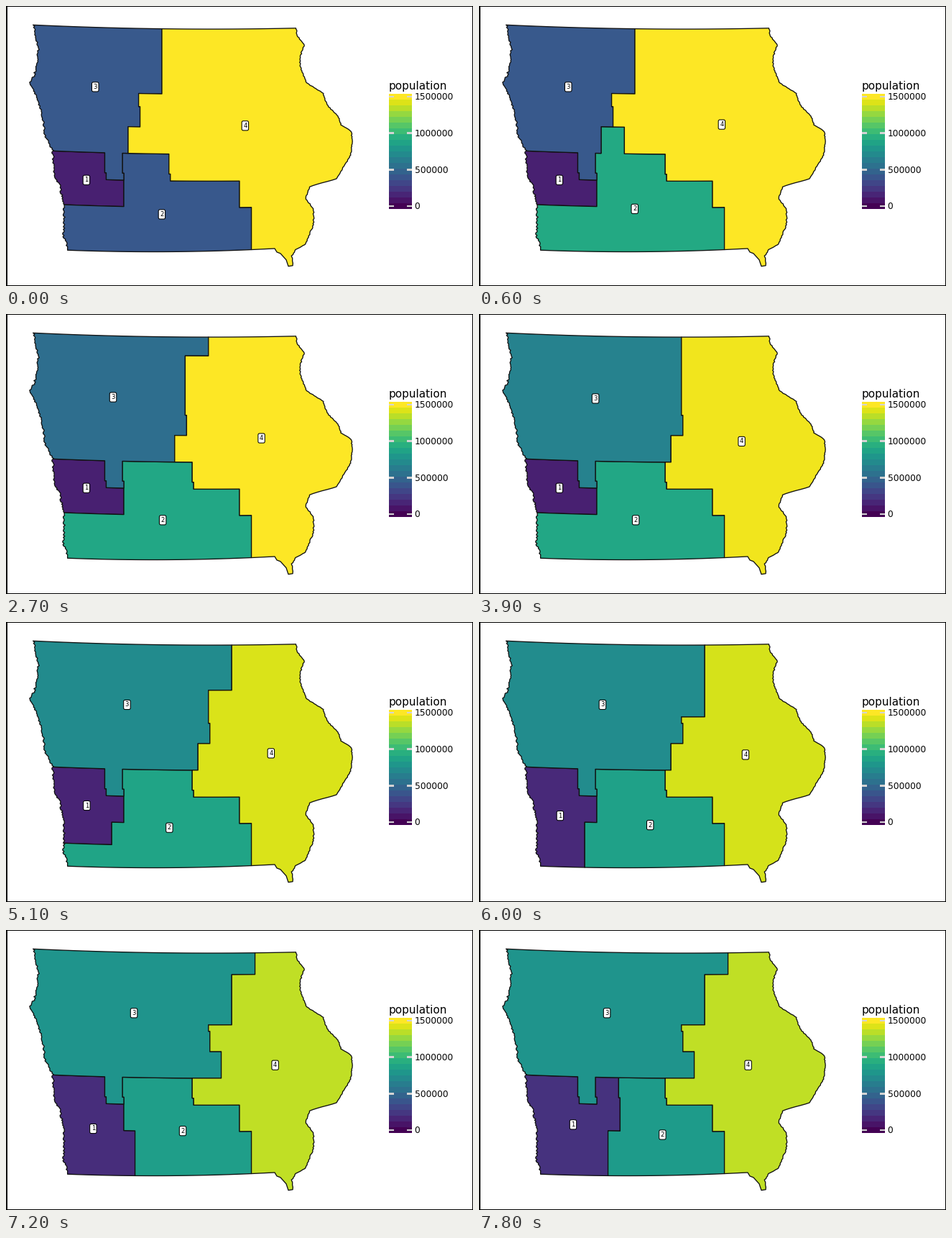
A matplotlib script for the animation above (8 s loop, 650 by 389 pixels).

```python
import numpy as np
import matplotlib.pyplot as plt
from matplotlib.animation import FuncAnimation
from matplotlib.patches import PathPatch, Rectangle
from matplotlib.path import Path

W, H, DPI = 650, 389, 100
TICKS_PER_MOVE = 3  # one move every 300 ms
MAX_POP = 1500  # thousands
plt.rcParams["font.family"] = "DejaVu Sans"
viridis = plt.get_cmap("viridis")

# The map is laid out on a straight grid, which the projection then bends.
SAG = 9.5e-5
COL, JOG = 32.4, 2  # county width, sideways step at a survey correction line
TOP, ROW1, ROW1_EAST, ROW2, MID, ROW3 = 32.4, 58.5, 62.4, 95.2, 122.8, 132.2
ROW4, ROW5, ROW6, ROW7, ROW8 = 169.2, 206.2, 243.6, 280.3, 311.5
JOG_NORTH, JOG_SOUTH = 141, 234
SOUTH = None  # bottom edge that follows the southern border


def bend(points):
    x, y = np.array(points).T
    return np.column_stack([x, y - SAG * (x - 285) ** 2])


def south(x):
    return 341.8 - 1.6e-4 * (x - 205) ** 2 + SAG * (x - 285) ** 2


def river(key_points, wiggle, seed):
    """River bank as x over y: key points joined, with seeded wiggles."""
    x, y = np.array(key_points).T
    y = y + SAG * (x - 285) ** 2
    ys = np.arange(TOP, y[-1], 1.7)
    noise = np.random.default_rng(seed).uniform(-wiggle, wiggle, len(ys))
    return ys, np.interp(ys, y, x) + noise


west = river([(38, 26), (41, 40), (45, 60), (44, 80), (39, 97), (33, 107), (44, 128),
              (51, 155), (54, 180), (65, 201), (67, 234), (75, 250), (80, 276),
              (81, 300), (80, 320), (87, 338)], 1.5, 8)
east = river([(404, 30), (405, 41), (415, 54), (409, 72), (410, 86), (418, 107),
              (441, 121), (447, 138), (464, 156), (466, 165), (481, 175), (482, 190),
              (480, 207), (471, 222), (459, 241), (440, 246), (423, 251), (417, 268),
              (428, 282), (428, 304), (417, 331), (403, 339), (398, 347), (399, 361)],
             0.8, 3)


def side(edge, y0, y1, jog):
    """Points down one side of a strip: a river bank or a county line."""
    if isinstance(edge, tuple):
        ys, xs = edge
        y1 = y1 or (south(87) if edge is west else ys[-1])
        inner = (ys > y0) & (ys < y1)
        y = np.concatenate([[y0], ys[inner], [y1]])
        return list(zip(np.interp(y, ys, xs), y))
    if jog:
        return [(edge, y0), (edge, jog), (edge + JOG, jog), (edge + JOG, y1)]
    return [(edge, y0), (edge, y1 or south(edge))]


def strip(left, right, y0, y1, jog=None, bottom=()):
    a, b = side(left, y0, y1, jog), side(right, y0, y1, jog)
    if y1 is SOUTH and right is not east:
        bottom = [(x, south(x)) for x in range(0, W, 10) if a[-1][0] < x < b[-1][0]]
    points = a + list(bottom) + b[::-1]
    return [(round(float(x), 2), round(float(y), 2)) for x, y in points]


# Row letter: top, bottom, left of column 0, jog
rows = {
    "A": (TOP, ROW1, 217, None), "B": (ROW1, ROW2, 217, None),
    "N": (TOP, ROW1_EAST, 217, None), "M": (ROW1_EAST, ROW2, 217, None),
    "C": (ROW2, ROW3, 217, None), "D": (ROW3, ROW4, 217, JOG_NORTH),
    "W": (MID, ROW4, 217 - COL, JOG_NORTH), "E": (ROW4, ROW5, 170, None),
    "F": (ROW5, ROW6, 162, JOG_SOUTH), "G": (ROW6, ROW7, 162 + JOG, None),
    "H": (ROW7, ROW8, 82.4, None), "I": (ROW8, SOUTH, 82.4, None),
}


def line(row, col):
    return rows[row][2] + COL * col


def county(cell):
    row, col = cell[0], int(cell[1])
    y0, y1, _, jog = rows[row]
    left = west if cell in ("H0", "I0") else line(row, col)
    return strip(left, line(row, col + 1), y0, y1, jog)


cores = {
    1: [strip(west, 137.5, ROW5, ROW6, JOG_SOUTH), strip(west, line("G", 0), ROW6, ROW7)],
    2: [county("F1"), strip(line("G", 1), 325, ROW6, ROW7),
        strip(line("H", 3), line("H", 8), ROW7, SOUTH)],
    3: [strip(west, 217, TOP, MID), strip(west, line("W", 0), MID, ROW4, JOG_NORTH),
        strip(west, line("E", 0), ROW4, ROW5),
        strip(137.5, line("F", 0), ROW5, ROW6, JOG_SOUTH)],
    4: [strip(line("N", 4), east, TOP, ROW1_EAST),
        strip(line("N", 3), east, ROW1_EAST, ROW3),
        strip(line("D", 2), east, ROW3, ROW4, JOG_NORTH),
        strip(line("E", 4), east, ROW4, ROW5),
        strip(line("F", 3), east, ROW5, ROW6, JOG_SOUTH),
        strip(325, east, ROW6, ROW7),
        strip(line("H", 8), east, ROW7, SOUTH,
              bottom=[(374, 338), (377, 343), (382, 345), (390, 354), (393, 363)])],
}

moves = ("E0>2 F2>2 E0>3 W0>3 A0+B0>3 E1>3 D0>3 C0>3 A1>3 B1>3 C1>3 D1>3 E2>3 "
         "N2>3 H0>1 M2>3 H1>1 I0>1 C2>3 I1>1 N3>3 H2>1 I2>1 E3>3 G0>1 F0>1").split()
cells = sorted({c for m in moves for c in m[:-2].split("+")})
start_owner = {c: 2 if c[0] in "FGHI" and c != "F2" else 4 for c in cells}
start_pop = {1: 131, 2: 405, 3: 415, 4: 2205}
RURAL_POP = 10
city_pop = {"F2": 490, "E2": 97, "M2": 42, "E3": 39, "W0": 36, "E1": 26}

# ---------- joining counties into districts ----------
county_shapes = {c: county(c) for c in cells}
all_shapes = sum(cores.values(), list(county_shapes.values()))
joints = {p for shape in all_shapes for p in shape}
joints |= {(x, r[0]) for r in rows.values() for x in range(40, 480, 20)}


def edges_of(shape):
    """Directed edges, split wherever a neighbour's corner touches them."""
    out = []
    for a, b in zip(shape, shape[1:] + shape[:1]):
        stops = [a, b]
        for i in (0, 1):
            if a[i] == b[i]:
                low, high = sorted((a[1 - i], b[1 - i]))
                stops = sorted((p for p in joints
                                if p[i] == a[i] and low <= p[1 - i] <= high),
                               key=lambda p: abs(p[1 - i] - a[1 - i]))
        out += zip(stops, stops[1:])
    return out


core_edges = {d: sum(map(edges_of, shapes), []) for d, shapes in cores.items()}
county_edges = {c: edges_of(s) for c, s in county_shapes.items()}


def outline(edges):
    """Rings left over once shared borders cancel out."""
    edges = set(edges)
    after = {a: b for a, b in edges if (b, a) not in edges}
    rings = []
    while after:
        ring = [min(after)]
        while ring[-1] in after:
            ring.append(after.pop(ring[-1]))
        rings.append(bend(ring))
    return rings


def centroid(rings):
    area, total = 0, np.zeros(2)
    for ring in rings:
        a, b = ring[:-1], ring[1:]
        cross = a[:, 0] * b[:, 1] - b[:, 0] * a[:, 1]
        area += cross.sum() / 2
        total += ((a + b) * cross[:, None]).sum(axis=0) / 6
    return total / area


def district_states():
    """Path, colour and label position of every district after each move."""
    owner, pop = dict(start_owner), dict(start_pop)
    states = []
    for move in [""] + moves:
        for cell in move[:-2].split("+") if move else []:
            people, new = city_pop.get(cell, RURAL_POP), int(move[-1])
            pop[owner[cell]] -= people
            pop[new] += people
            owner[cell] = new
        state = {}
        for d in cores:
            owned = [county_edges[c] for c in cells if owner[c] == d]
            rings = outline(sum(owned, core_edges[d]))
            path = Path.make_compound_path(*(Path(r, closed=True) for r in rings))
            state[d] = path, viridis(min(1.0, pop[d] / MAX_POP)), centroid(rings)
        states.append(state)
    return states


states = district_states()

# ---------- drawing ----------
# The black figure shows as a thin frame around the white map.
fig = plt.figure(figsize=(W / DPI, H / DPI), dpi=DPI, facecolor="black")
ax = fig.add_axes([2 / W, 1 / H, (W - 3) / W, (H - 2) / H], facecolor="white")
ax.set(xlim=(2, W - 1), ylim=(H - 0.7, 1.3), xticks=[], yticks=[])
ax.spines[:].set_visible(False)

ax.text(532.5, 110.5, "population", size=11, va="center_baseline")
BINS, BAR_LEFT, BAR_TOP, BAR_W, BAR_H = 20, 532.5, 122.3, 32.5, 160
bin_h = BAR_H / BINS
for k in range(BINS):
    ax.add_patch(Rectangle((BAR_LEFT, BAR_TOP + BAR_H - (k + 1) * bin_h), BAR_W, bin_h,
                           fc=viridis(k / (BINS - 1)), lw=0, antialiased=False))
for value in range(0, 1500001, 500000):
    y = BAR_TOP + BAR_H - bin_h / 2 - (BAR_H - bin_h) * value / 1500000
    for x in (BAR_LEFT, BAR_LEFT + BAR_W - 7):
        ax.add_patch(Rectangle((x, y - 1.2), 7, 2.4, fc="lightgray", lw=0))
    ax.text(568.7, y - 0.8, str(value), size=8.8, va="center_baseline")

patches, labels = {}, {}
for d, (path, color, (x, y)) in states[0].items():
    patches[d] = ax.add_patch(PathPatch(path, fc=color, ec="#111111", lw=0.95,
                                        joinstyle="round"))
    labels[d] = ax.text(x, y, str(d), size=6, ha="center", va="center", zorder=5,
                        bbox=dict(boxstyle="round,pad=0.25", fc="white",
                                  ec="black", lw=0.75))


def update(frame):
    for d, (path, color, position) in states[frame // TICKS_PER_MOVE].items():
        patches[d].set_path(path)
        patches[d].set_facecolor(color)
        labels[d].set_position(position)
    return [*patches.values(), *labels.values()]


anim = FuncAnimation(fig, update, frames=80, interval=100, repeat=True, repeat_delay=0)
plt.show()
```
